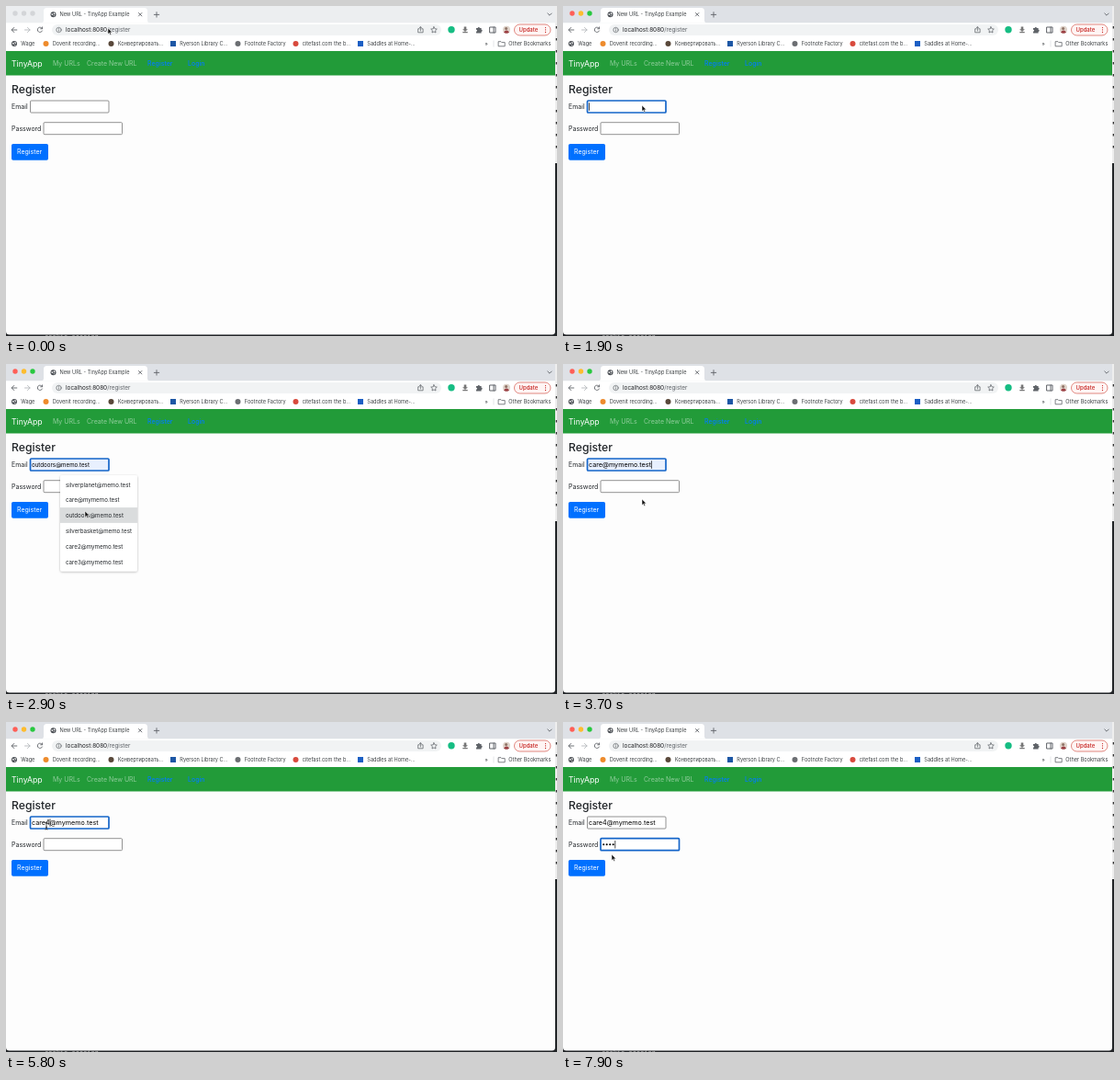
An HTML page for the animation above (8 s loop, 600x359 px).

```html
<!DOCTYPE html>
<html lang="en">
<head>
<meta charset="utf-8">
<title>TinyApp registration</title>
<style>
  html, body { margin: 0; height: 100%; overflow: hidden; background: #222; }
  svg { display: block; width: 100vw; height: 100vh; }
  text { font: 7px Inter, "Open Sans", sans-serif; fill: #212529; white-space: pre; }
  .chrome text { font-size: 5.6px; fill: #3c4043; }
  .line { fill: none; stroke: #5f6368; stroke-width: .9; stroke-linecap: round; stroke-linejoin: round; }
  .muted { fill: #90cd9c; }
  .link { fill: #007bff; font-weight: 500; }
  .field { fill: #fff; stroke: #767676; stroke-width: .8; }
  .field.focus { stroke: #1465c9; stroke-width: 1.7; }
  .field.filled { fill: #e8f0fe; }
  #menu text { font-size: 6.2px; }
</style>
</head>
<body>
<svg viewBox="0 0 600 359" preserveAspectRatio="none">
  <defs>
    <g id="globe">
      <circle r="3" fill="#4d5156"/>
      <path d="M-2-1.2L0-.6-.8.8-1.8.4ZM.5-2.2L2-1 1.4.3.4-.6ZM.2 1L1.6 1 .6 2.3Z" fill="#fff"/>
    </g>
    <filter id="shadow" x="-10%" y="-10%" width="120%" height="120%">
      <feDropShadow dx="0" dy=".8" stdDeviation="1" flood-opacity=".3"/>
    </filter>
  </defs>

  <!-- Windows behind the browser -->
  <rect width="600" height="359" fill="#202326"/>
  <rect x="590" width="10" height="171" fill="#eee"/>
  <g id="edge" fill="#333"></g>
  <text x="42" y="362.2" style="font: 7px 'DejaVu Sans Mono', monospace; fill: #bbb">cookie-session</text>
  <path d="M0 0H598V354Q598 357.5 594.5 357.5H3.5Q0 357.5 0 354Z" fill="#fdfdfd"/>

  <g class="chrome">
    <rect id="strip" width="598" height="18.5"/>
    <path d="M38 18.5Q41 18.5 41 15.5V5.5Q41 2 44.5 2H150.5Q154 2 154 5.5V15.5Q154 18.5 157 18.5Z" fill="#fff"/>
    <g id="lights"><circle cx="10" cy="8"/><circle cx="19.5" cy="8"/><circle cx="29" cy="8"/></g>
    <use href="#globe" x="51.5" y="9.3"/>
    <text x="58.5" y="11.3">New URL - TinyApp Example</text>
    <path class="line" d="M144.5 7.5l3.4 3.4m0-3.4l-3.4 3.4M164 6.7v5.4m-2.7-2.7h5.4M589.8 8l2.2 2.2L594.2 8"/>

    <rect y="18.5" width="598" height="30" fill="#fff"/>
    <rect x="50" y="20" width="424" height="12" rx="6" fill="#f1f3f4"/>
    <path class="line" d="M11.8 26H6.2m2.6-2.6L6.2 26l2.6 2.6M39.4 24.5A2.7 2.7 0 1 0 39.5 27M39.6 22.9v1.9h-1.9"/>
    <path class="line" style="stroke:#b5b8bc" d="M20.5 26h5.6m-2.6-2.6l2.6 2.6-2.6 2.6"/>
    <g class="line" style="stroke-width:.7"><circle cx="57.5" cy="26" r="2.7"/><path d="M57.5 25.8v1.5M57.5 24.5v.1"/></g>
    <text x="65" y="28.2" style="font-size:6.4px; fill:#202124">localhost:8080<tspan fill="#5f6368">/register</tspan></text>
    <g class="line" style="stroke-width:.75">
      <path d="M450 24.8h-1.3v4h5.4v-4h-1.3M451.4 27v-4.3m-1.3 1.3l1.3-1.3 1.3 1.3"/>
      <path d="M466 22.7l1 2.1 2.3.3-1.7 1.6.4 2.3-2-1.1-2 1.1.4-2.3-1.7-1.6 2.3-.3Z"/>
      <path d="M527 23h6v6h-6ZM531 23v6" stroke-width="1"/>
    </g>
    <circle cx="485" cy="25.8" r="3.7" fill="#16bd83"/>
    <path d="M498.7 22.5h2.6v2.7h1.6L500 28 497.1 25.2h1.6ZM497.3 28h5.4v1.2h-5.4Z" fill="#777"/>
    <path d="M512 24h1.7a1.1 1.1 0 1 1 2.2 0h1.7v1.7a1.1 1.1 0 1 1 0 2.2v1.6H512v-1.7a1 1 0 1 0 0-2Z" fill="#5f6368"/>
    <circle cx="545" cy="25.8" r="4" fill="#dfd3ca"/>
    <path d="M542 28.7Q545 24.5 548 28.7Q545 31 542 28.7" fill="#9b3e43"/><circle cx="544.6" cy="24.5" r="1.5" fill="#8f7467"/>
    <rect x="553.5" y="20" width="39.5" height="12" rx="6" fill="#fff5f4" stroke="#d96a61" stroke-width=".8"/>
    <text x="558.5" y="28.1" style="font-size:6px; font-weight:500; fill:#c5221f">Update</text>
    <path d="M587.5 23.5v.1m0 2.3v.1m0 2.3v.1" class="line" style="stroke:#c5221f; stroke-width:1.2"/>

    <g id="bookmarks"><use href="#globe" x="9" y="41"/></g>
    <text x="521.5" y="42.7">»</text>
    <path d="M531 37.5v7" stroke="#dadce0" stroke-width=".7"/>
    <path d="M536.5 38.7h2.5l.8.9h3.4v4.2h-6.7Z" class="line" style="stroke-width:.8"/>
  </g>

  <!-- Page -->
  <rect y="49" width="598" height="26.5" fill="#229b39"/>
  <text x="6" y="65.8" style="font-size:8.7px; fill:#fff">TinyApp</text>
  <text class="muted" x="51" y="65.3">My URLs</text>
  <text class="muted" x="88" y="65.3">Create New URL</text>
  <text class="link" x="154" y="65.3">Register</text>
  <text class="link" x="198" y="65.3">Login</text>

  <text x="6" y="95.3" style="font-size:12.2px; font-weight:500">Register</text>
  <text x="6" y="112">Email</text>
  <rect id="email" class="field" x="26.5" y="103" width="85.5" height="13" rx="1"/>
  <text id="emailText" x="28" y="112" style="fill:#000"></text>
  <text x="6" y="135.6">Password</text>
  <rect id="password" class="field" x="41" y="126.7" width="85.5" height="13" rx="1"/>
  <g id="dots"></g>
  <rect id="caret" width=".7" height="8.5"/>
  <rect x="6" y="150" width="40" height="17.7" rx="1.8" fill="#0070ff"/>
  <text x="12" y="161.4" style="fill:#fff">Register</text>

  <g id="menu">
    <rect x="59" y="121" width="84" height="104.5" rx="2" fill="#fff" filter="url(#shadow)"/>
    <rect id="hover" x="59" width="84" height="16.8" fill="#dadcdd"/>
  </g>

  <path id="arrow" d="M0 0V6.6L1.5 5.2 2.5 7.5 3.6 7 2.6 4.8H4.6Z" fill="#111" stroke="#fff" stroke-width=".5"/>
  <path id="beam" d="M-1.5-4Q0-4 0-3Q0-4 1.5-4M0-3V3M-1.5 4Q0 4 0 3Q0 4 1.5 4M-1 1.3H1" fill="none" stroke="#222" stroke-width=".8"/>
</svg>
<script>
const DURATION = 8000;
const $ = id => document.getElementById(id);
const add = (parent, markup) => $(parent).insertAdjacentHTML('beforeend', markup);
const show = (id, visible) => $(id).setAttribute('visibility', visible ? 'visible' : 'hidden');
const move = (id, x, y) => $(id).setAttribute('transform', `translate(${x} ${y})`);

const ROW = 16.8, MENU_TOP = 123;
const suggestions = ['silverplanet@memo.test', 'care@mymemo.test', 'outdoors@memo.test',
  'silverbasket@memo.test', 'care2@mymemo.test', 'care3@mymemo.test'];
suggestions.forEach((label, i) => add('menu', `<text x="65" y="${133.6 + i * ROW}">${label}</text>`));

// Icon centre, icon shape, icon colour, label
[[9, '', '', 'Wage'],
 [43.5, 'circle', '#ee8b2c', 'Dovenit recording...'],
 [114.5, 'circle', '#59483a', 'Конвертировать...'],
 [182, 'square', '#1d57a5', 'Ryerson Library C...'],
 [252.5, 'circle', '#6b6e72', 'Footnote Factory'],
 [315.5, 'circle', '#d84a3d', 'citefast.com the b...'],
 [386, 'square', '#1c5fc4', 'Saddles at Home-...'],
 [540, '', '', 'Other Bookmarks']
].forEach(([x, shape, color, label]) => {
  if (shape) add('bookmarks', `<rect x="${x - 3}" y="38" width="6" height="6" rx="${shape === 'circle' ? 3 : 0}" fill="${color}"/>`);
  add('bookmarks', `<text x="${x + 7.3}" y="42.9">${label}</text>`);
});

for (let y = 22; y < 160; y += 13) add('edge', `<rect x="598.7" y="${y}" width="1.3" height="2.5"/>`);
for (let i = 0; i < 4; i++) add('dots', `<circle cx="${44.2 + i * 3.5}" cy="133.3" r="1.05"/>`);

const ACTIVATE = 900, OPEN = 2100, PICK = 3600, PLACE = 4600, TYPE = 5500, PASSWORD = 6800;
const keys = [7100, 7300, 7500, 7700];
const actions = [ACTIVATE, PICK, PLACE, TYPE, PASSWORD, ...keys];

// Pointer position over time: ms, x, y
const path = [[0, 111, 24], [100, 111, 24], [800, 86, 108], [2100, 86, 108], [2700, 86, 160],
  [3000, 86, 160], [3400, 86, 147], [3800, 86, 147], [4500, 43, 109.5], [5200, 43, 109.5],
  [5700, 44, 113], [6000, 44, 113], [6600, 53, 133], [7300, 53, 133], [7700, 53, 144], [8000, 53, 144]];

function pointerAt(t) {
  const i = path.findIndex(p => p[0] > t);
  const [t0, x0, y0] = path[i - 1], [t1, x1, y1] = path[i];
  const u = (t - t0) / (t1 - t0), ease = u * u * (3 - 2 * u);
  return [x0 + (x1 - x0) * ease, y0 + (y1 - y0) * ease];
}

function draw(t) {
  const [x, y] = pointerAt(t);
  const active = t >= ACTIVATE, onPassword = t >= PASSWORD;
  const menuOpen = t >= OPEN && t < PICK;
  const row = Math.floor((y - MENU_TOP) / ROW);
  const hovering = menuOpen && row >= 0;

  $('strip').setAttribute('fill', active ? '#dee1e6' : '#eceef0');
  const colors = active ? ['#ff5f57', '#febc2e', '#28c840'] : ['#d3d5d8', '#d3d5d8', '#d3d5d8'];
  [...$('lights').children].forEach((light, i) => {
    light.setAttribute('r', 2.7);
    light.setAttribute('fill', colors[i]);
  });

  const email = t >= TYPE ? 'care4@mymemo.test' : t >= PICK ? suggestions[1] : hovering ? suggestions[row] : '';
  $('emailText').textContent = email;
  $('emailText').style.fontSize = menuOpen ? '6.2px' : '7.2px';
  $('email').classList.toggle('focus', active && !onPassword);
  $('email').classList.toggle('filled', email !== '' && t < TYPE);
  $('password').classList.toggle('focus', onPassword);

  const typed = keys.filter(k => t >= k).length;
  [...$('dots').children].forEach((dot, i) => dot.setAttribute('visibility', i < typed ? 'visible' : 'hidden'));

  const text = $('emailText');
  const prefix = t >= TYPE ? 5 : t >= PLACE ? 4 : email.length;
  const caretX = onPassword ? 42.5 + typed * 3.5 : 28 + (email ? text.getSubStringLength(0, prefix) : 0);
  const lastAction = actions.filter(a => a <= t).pop();
  move('caret', caretX, onPassword ? 129 : 105.3);
  show('caret', active && !hovering && (t - lastAction) % 1000 < 500);

  show('menu', menuOpen);
  show('hover', hovering);
  $('hover').setAttribute('y', MENU_TOP - .5 + row * ROW);

  const beam = t >= 4400 && y < 140;
  show('beam', beam);
  show('arrow', !beam);
  move('beam', x, y);
  move('arrow', x, y);
}

function tick() {
  draw(performance.now() % DURATION);
  requestAnimationFrame(tick);
}
tick();
</script>
</body>
</html>
```
